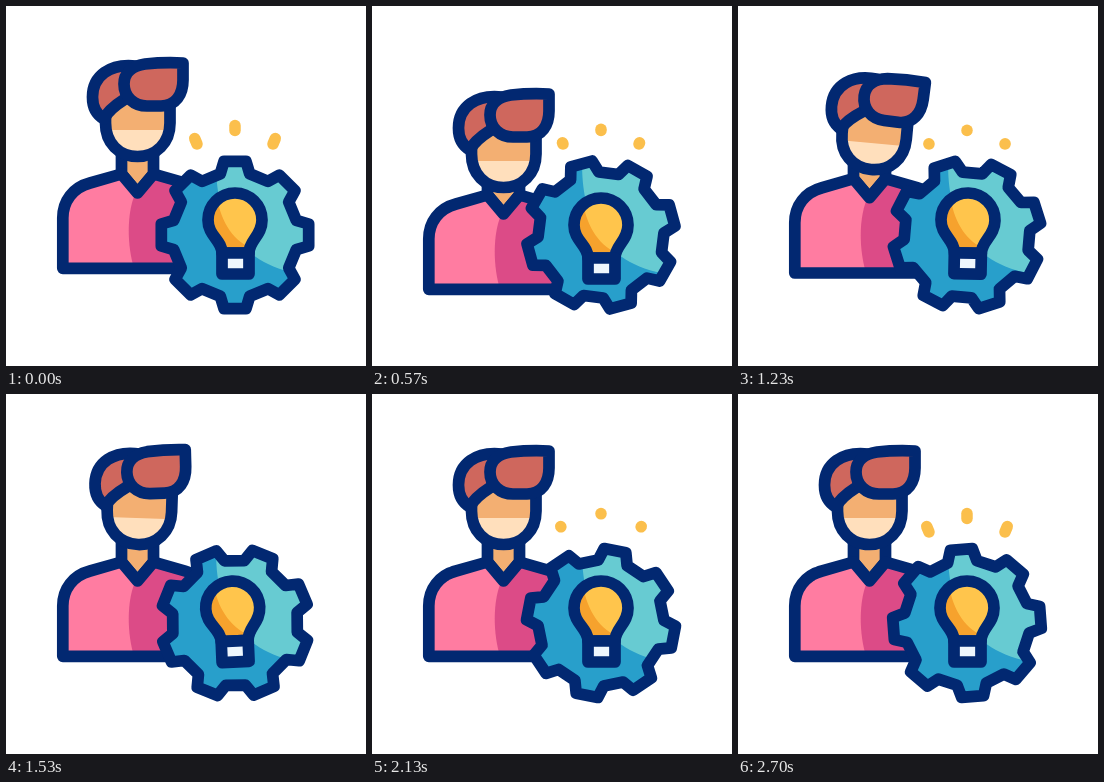
An HTML page for the animation above (2730 ms loop, 360 px wide and 360 px high).

```html
<!DOCTYPE html>
<html lang="en">
<head>
<meta charset="utf-8">
<title>Person with idea gear</title>
<style>
  html, body { margin: 0; height: 100%; overflow: hidden; background: #fff; }
  svg { display: block; width: 100%; height: 100%; }
  .line { stroke: #022871; stroke-width: 11.7; stroke-linejoin: round; stroke-linecap: round; }
  .hair { fill: #cf675d; }
  .skin { fill: #f3af72; }
  #sparks { stroke: #fbbf4c; stroke-width: 11.5; stroke-linecap: round; }
</style>
</head>
<body>
<svg viewBox="0 0 360 360">
  <defs>
    <clipPath id="gearClip"><path id="gearMask"/></clipPath>
    <clipPath id="faceClip"><path id="face" d="M99.500 98V117C99.500 137 113 150.500 131.500 150.500S164 137 164 117V90H112Z"/></clipPath>
    <path id="torso" d="M56.800 262.300V212C56.800 195 67 181.500 84 177L115.500 168L131.500 187L147.500 168L179 177C196 181.500 206 195 206 212V262.300Z"/>
    <clipPath id="torsoClip"><use href="#torso"/></clipPath>
    <path id="glass" d="M216 247C216 234 202 230 202 214A27 27 0 0 1 256 214C256 230 243 234 243 247Z"/>
    <clipPath id="glassClip"><use href="#glass"/></clipPath>
  </defs>

  <g id="body">
    <path class="line skin" d="M115.500 148V168L131.500 187L147.500 168V148Z"/>
    <use href="#torso" fill="#ff7ca1"/>
    <path clip-path="url(#torsoClip)" fill="#dc4b87" d="M131 184C120 204 121 240 128 262H210V165H148Z"/>
    <use href="#torso" class="line" fill="none"/>
  </g>

  <g id="head">
    <use href="#face" fill="#ffdfbc"/>
    <path class="skin" clip-path="url(#faceClip)" d="M90 85H170V124H90Z"/>
    <use href="#face" class="line" fill="none"/>
    <path class="line hair" d="M130 60C104 57 86.500 70 86.500 91C86.500 102 91 109 98 113C101 106 108 100 119 93Z"/>
    <path id="quiff" class="line hair" d="M177 57Q158 56 139 58C125 60 118 68 118 78C118 91 128 100 141 100H155C170 100 177 88 177 74Z"/>
  </g>

  <g id="sparks"><line/><line/><line/></g>

  <g clip-path="url(#gearClip)">
    <path fill="#67cbd2" d="M140 140H320V320H140Z"/>
    <path fill="#289fcb" d="M140 140H211C207 185 214 252 290 267L280 320H140Z"/>
  </g>
  <path id="gear" class="line" fill="none"/>

  <g id="bulb">
    <use href="#glass" fill="#ffc54c"/>
    <path clip-path="url(#glassClip)" fill="#f6a22d" d="M195 185H211C211 205 222 230 241 240V250H195Z"/>
    <use href="#glass" class="line" fill="none"/>
    <path class="line" fill="#eef6fd" d="M216 247H243V268H216Z"/>
  </g>
</svg>

<script>
const LOOP = 2730, STEPS = 82;
const $ = id => document.getElementById(id);
const clamp = v => Math.max(0, Math.min(1, v));
const mix = (a, b, u) => a + (b - a) * u;

// Cosine-eased value through [time, value] keys.
function track(keys, t) {
  const i = keys.findIndex(key => key[0] > t);
  if (i < 0) return keys.at(-1)[1];
  if (i === 0) return keys[0][1];
  const [t0, v0] = keys[i - 1], [t1, v1] = keys[i];
  return mix(v0, v1, (1 - Math.cos(Math.PI * (t - t0) / (t1 - t0))) / 2);
}

const bodyY = [[0, 0], [500, 21], [800, 21], [1430, 0]];
const headY = [[0, 0], [570, 31], [900, 31], [1500, 0]];
const headTilt = [[570, 0], [970, 6.5], [2000, -1.5], [2130, 0]];
const quiffTilt = [[570, 0], [970, 6.5], [1530, -3.5], [2130, 0]];
const bulbY = [[330, 0], [570, 5], [900, 0]];
const bulbTilt = [[570, 0], [970, 4], [1530, -2.5], [2100, 0]];

// Inner and outer end of each spark.
const sparks = [
  [191, 138, 188.7, 132.5],
  [229, 124.5, 229, 119.5],
  [267, 138, 269.3, 132.5]
];

function gearPath() {
  const points = [];
  for (let tooth = 0; tooth < 360; tooth += 45)
    for (const [offset, r] of [[-13.5, 63], [-8.5, 74.5], [8.5, 74.5], [13.5, 63]]) {
      const a = (tooth + offset) * Math.PI / 180;
      points.push((229 + r * Math.sin(a)).toFixed(2) + " " + (229 - r * Math.cos(a)).toFixed(2));
    }
  return "M" + points.join("L") + "Z";
}
for (const id of ["gear", "gearMask"]) $(id).setAttribute("d", gearPath());

const move = (id, value) => $(id).setAttribute("transform", value);

function draw(now) {
  const step = Math.floor((now % LOOP) * STEPS / LOOP + 0.15) % STEPS;
  const t = step * LOOP / STEPS;

  move("body", `translate(0 ${track(bodyY, t)})`);
  move("head", `translate(0 ${track(headY, t)}) rotate(${track(headTilt, t)} 131 165)`);
  move("quiff", `rotate(${track(quiffTilt, t)} 128 80)`);
  move("bulb", `translate(0 ${track(bulbY, t)}) rotate(${track(bulbTilt, t)} 229 266)`);
  for (const id of ["gear", "gearMask"]) move(id, `rotate(${360 * step / STEPS} 229 229)`);

  // Sparks grow outwards from the inner end, then shrink to the outer end.
  const phase = (4 * step / STEPS + 0.25) % 1;
  const front = clamp((phase - 0.05) / 0.13), tail = clamp((phase - 0.25) / 0.13);
  $("sparks").style.display = front > tail ? "" : "none";
  [...$("sparks").children].forEach((line, i) => {
    const [x0, y0, x1, y1] = sparks[i];
    const ends = { x1: mix(x0, x1, tail), y1: mix(y0, y1, tail), x2: mix(x0, x1, front), y2: mix(y0, y1, front) };
    for (const name in ends) line.setAttribute(name, ends[name]);
  });
}

let start;
function frame(now) {
  start ??= now;
  draw(now - start);
  requestAnimationFrame(frame);
}
draw(0);
requestAnimationFrame(frame);
</script>
</body>
</html>
```
